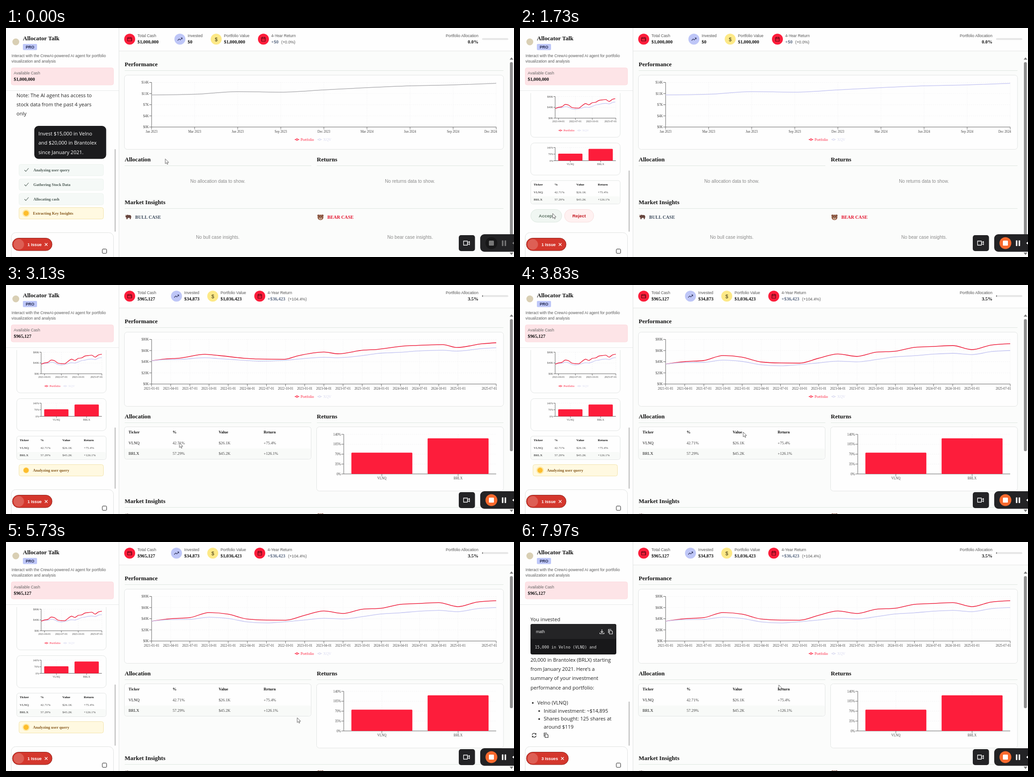
An HTML page for the animation above (8000 ms loop, 1113 px wide and 503 px high).

```html
<!DOCTYPE html>
<html lang="en">
<head>
<meta charset="utf-8">
<title>Portfolio dashboard</title>
<style>
html, body { margin: 0; width: 100%; height: 100%; overflow: hidden; background: #fcfcfc; }
svg { display: block; width: 1113px; height: 503px; }
text { white-space: pre; }
.serif { font-family: "Liberation Serif", serif; }
.sans { font-family: "Liberation Sans", sans-serif; }
.chat { font-family: "Open Sans", sans-serif; }
.mono { font-family: "DejaVu Sans Mono", monospace; }
.b { font-weight: 700; }
</style>
</head>
<body>
<svg id="stage" viewBox="0 0 1113 503"></svg>
<script>
const LOOP = 8000;
const RESULTS = 430, ACCEPTED = 2330, CHARTS = 2490, REPLY = 6400, CODE = 6560, STREAM = 6919, ISSUES = 7400;
const RED = '#fd1d3b', LINE_RED = '#ee2340', LAVENDER = '#c9caf3', BORDER = '#e2e5e4', INK = '#111';
const TICKERS = ['VLNQ', 'BRLX'], RETURNS = [75.4, 126.1];

const clamp = (v, lo = 0, hi = 1) => Math.min(hi, Math.max(lo, v));
const mix = (a, b, p) => a + (b - a) * p;

// cubic-bezier(.25, .1, .25, 1)
function ease(x) {
  x = clamp(x);
  if (x === 0 || x === 1) return x;
  const bez = (a, b, u) => 3 * a * u * (1 - u) ** 2 + 3 * b * u * u * (1 - u) + u ** 3;
  let lo = 0, hi = 1;
  for (let i = 0; i < 24; i++) {
    const mid = (lo + hi) / 2;
    if (bez(.25, .25, mid) < x) lo = mid; else hi = mid;
  }
  return bez(.1, 1, lo);
}

// ---- drawing helpers ----
const text = (x, y, s, cls, size, fill = INK, anchor = 'start') =>
  `<text x="${x}" y="${y}" class="${cls}" font-size="${size}" fill="${fill}" text-anchor="${anchor}">${s}</text>`;
const rect = (x, y, w, h, r, fill, stroke = 'none') =>
  `<rect x="${x}" y="${y}" width="${w}" height="${h}" rx="${r}" fill="${fill}" stroke="${stroke}"/>`;
const circle = (x, y, r, fill) => `<circle cx="${x}" cy="${y}" r="${r}" fill="${fill}"/>`;
const path = (d, stroke, w = 1, extra = '') =>
  `<path d="${d}" fill="none" stroke="${stroke}" stroke-width="${w}" ${extra}/>`;
const at = (x, y, s) => `<g transform="translate(${x} ${y})">${s}</g>`;
const group = (id, s = '') => `<g id="${id}">${s}</g>`;
const card = (x, y, w, h, r = 6) => rect(x, y, w, h, r, '#fefefe', BORDER);

function heading(x, y, label, right) {
  return text(x, y, label, 'serif b', 13) + path(`M${x} ${y + 9.5}H${right}`, '#dfe7e0');
}

function axes(box, yLabels, xTicks, size) {
  const { x0, x1, y0, y1 } = box, tick = size > 6 ? 5 : 3.5;
  let grid = '', out = path(`M${x0} ${y0}V${y1}H${x1}`, '#666');
  yLabels.forEach((label, i) => {
    const y = mix(y0, y1, i / (yLabels.length - 1));
    grid += `M${x0} ${y}H${x1}`;
    out += path(`M${x0 - tick} ${y}h${tick}`, '#666') +
      text(x0 - tick - 1, y + size * .36, label, 'serif', size, '#444', 'end');
  });
  for (const [x, label, atEnd] of xTicks) {
    grid += `M${x} ${y0}V${y1}`;
    out += path(`M${x} ${y1}v${tick}`, '#666') +
      text(atEnd ? x + 2 : x, y1 + tick + size, label, 'serif', size, '#444', atEnd ? 'end' : 'middle');
  }
  return path(grid, '#f0f0f2', .8, 'stroke-dasharray="2.2 2.2"') + out;
}

function legend(x, y, size) {
  const k = size / 8.2;
  const key = (dx, label, color) => at(x + dx * k, y,
    path(`M${-5 * k} 0H${5 * k}`, color, 1.3 * k) +
    `<circle r="${1.9 * k}" fill="#fff" stroke="${color}" stroke-width="${1.2 * k}"/>` +
    text(8 * k, size * .32, label, 'serif', size, color));
  return key(0, 'Portfolio', RED) + key(49.5, 'XQV', '#d9daf0');
}

function bars(box, grow) {
  const { x0, x1, y0, y1 } = box, band = (x1 - x0) / 2;
  return RETURNS.map((v, i) => {
    const h = (y1 - y0) * v / 140 * grow;
    return h > 0 ? rect(x0 + band * (i + .1), y1 - h, band * .8, h, 1.5, RED) : '';
  }).join('');
}

function table(x, y, w, h, cols, size, rowGap) {
  const rows = [['Ticker', '%', 'Value', 'Return'],
    [TICKERS[0], '42.71%', '$26.1K', '+75.4%'], [TICKERS[1], '57.29%', '$45.2K', '+126.1%']];
  const first = y + rowGap * .64;
  return card(x, y, w, h, 5) + rect(x + 1, y + h - rowGap, w - 2, rowGap - 1, 4, '#f8faf8') +
    rows.map((row, r) => row.map((cell, c) =>
      text(cols[c], first + r * rowGap, cell, r ? 'serif' : 'serif b', size, r && c ? '#444' : INK)).join('')).join('');
}

// Monotone cubic through points with increasing x
function curve(points) {
  const p = points.filter((q, i) => !i || Math.hypot(q[0] - points[i - 1][0], q[1] - points[i - 1][1]) > .01);
  const n = p.length;
  const h = i => p[i + 1][0] - p[i][0];
  const s = i => (p[i + 1][1] - p[i][1]) / (h(i) || 1);
  const m = p.map((_, i) => {
    if (!i || i === n - 1) return null;
    const a = s(i - 1), b = s(i), mean = (a * h(i) + b * h(i - 1)) / (h(i - 1) + h(i));
    return (Math.sign(a) + Math.sign(b)) * Math.min(Math.abs(a), Math.abs(b), .5 * Math.abs(mean)) || 0;
  });
  m[0] = (3 * s(0) - m[1]) / 2;
  m[n - 1] = (3 * s(n - 2) - m[n - 2]) / 2;
  let d = `M${p[0]}`;
  for (let i = 0; i < n - 1; i++) {
    const k = h(i) / 3, [xa, ya] = p[i], [xb, yb] = p[i + 1];
    d += `C${xa + k} ${ya + k * m[i]} ${xb - k} ${yb - k * m[i + 1]} ${xb} ${yb}`;
  }
  return d;
}

// ---- chart data ----
const MAIN = { x0: 319, x1: 1074, y0: 119.5, y1: 217.5 };
const RETURN_BOX = { x0: 740, x1: 1074, y0: 328, y1: 415 };
const MINI = { x0: 77, x1: 210, y0: 150.5, y1: 198 };
const MINI_BARS = { x0: 77, x1: 210, y0: 262.5, y1: 291.5 };
const spread = (ys, box) => ys.map((y, i) => [mix(box.x0, box.x1, i / (ys.length - 1)), y]);
const oldLine = spread([147, 145.5, 139.7, 141, 136, 131, 127, 125, 121.5], MAIN);
const portfolio = spread([174, 168.5, 166, 155, 158.5, 169.3, 171.5, 171.8, 161, 151.5, 157, 147.7, 145.5,
  137, 135, 133.2, 142, 132, 129], MAIN);
const benchmark = spread([174, 170.5, 170, 165.2, 168, 175.5, 177.8, 175, 171.3, 167.5, 169, 164, 158,
  155.5, 152, 150.3, 153, 146.5, 144], MAIN);
const toMini = ([x, y]) => [
  mix(MINI.x0, MINI.x1, (x - MAIN.x0) / (MAIN.x1 - MAIN.x0)),
  mix(MINI.y0, MINI.y1, (y - MAIN.y0) / (MAIN.y1 - MAIN.y0))];
const morph = (to, p) => to.map((pt, i) => {
  const from = oldLine[Math.floor(i * oldLine.length / to.length)];
  return [mix(from[0], pt[0], p), mix(from[1], pt[1], p)];
});
const quarter = i => `${2021 + (i >> 2)}-${['01', '04', '07', '10'][i % 4]}-01`;
const quarterTick = (box, i) => [mix(box.x0, box.x1, i / 18), quarter(i), i === 18];
const oldTicks = oldLine.map(([x], i) =>
  [x, i ? `${['Dec', 'Mar', 'Jun', 'Sep'][i % 4]} ${i < 5 ? 2023 : 2024}` : 'Jan 2023', i === 8]);
const tickerTicks = box => TICKERS.map((name, i) => [mix(box.x0, box.x1, .25 + i / 2), name]);

// ---- icons ----
const glyphs = {
  wallet: path('M-4.5 -3.5H3.5V-1.5M-4.5 -3.5V4H4.5V-1.5H-4.5M2 1.2h2.5', '#46060f', 1.1),
  trend: path('M-5 3L-1.5 -.5L.8 1.8L5 -2.6M2 -2.8H5V.2', '#2b2f55', 1.1),
  dollar: text(0, 4, '$', 'sans', 11, '#3b3410', 'middle'),
  calendar: path('M-4 -3.5H4V4.5H-4ZM-4 -.8H4M-2 -5v2.5M2 -5v2.5', '#46060f', 1.1),
  copy: path('M-2 -2.5H2.5L4.500 -.5V5H-2ZM-4.200 3V-5H2', 'currentColor', 1.2),
  download: path('M0 -5V2M-2.8 -.6L0 2.2L2.8 -.6M-4.5 2V4.5H4.5V2', 'currentColor', 1.2),
  refresh: path('M-4.4 -1A4.6 4.6 0 0 1 4 -2.2V-4.8M4 -2.2H1.5M4.4 1A4.6 4.6 0 0 1 -4 2.2V4.8M-4 2.2H-1.5', 'currentColor', 1.2)
};
const icon = (name, x, y, color = '#333') => `<g color="${color}">${at(x, y, glyphs[name])}</g>`;
const bull = at(268, 415, '<path d="M-6 -3Q-3 -6 1 -4Q6 -5 6.500 0L5 5H3.500L3 2H-1L-2 5H-4L-4.500 1Q-7 1 -6 -3Z" fill="#67463e"/>' +
  path('M-6.500 -5q1 2 3 1.500', '#b9a79b', 1.2));
const bear = at(689, 416, circle(-4.5, -4, 2.3, '#7c4a38') + circle(4.5, -4, 2.3, '#7c4a38') +
  `<ellipse rx="6.500" ry="6" fill="#95604a"/><ellipse cy="2" rx="3" ry="2.500" fill="#d9b59c"/>` +
  circle(-2.5, -1.3, .8, '#2a1a14') + circle(2.5, -1.3, .8, '#2a1a14') + circle(0, 1.2, 1, '#2a1a14'));

// ---- sections ----
function stats(xs, values, change, percent, allocation) {
  const labels = ['Total Cash', 'Invested', 'Portfolio Value', '4-Year Return'];
  const fills = [RED, '#bec6f7', '#fde987', RED];
  const names = ['wallet', 'trend', 'dollar', 'calendar'];
  const changeX = xs[3] + 17;
  return xs.map((x, i) => circle(x, 24.5, 12, fills[i]) + icon(names[i], x, 24.5) +
    text(x + 17, 20.3, labels[i], 'sans', 8.7, '#555') +
    (values[i] ? text(x + 17, 34, values[i], 'serif b', 10.3) : '')).join('') +
    text(changeX, 34, change, 'serif b', 10.2, '#5a6982') +
    text(changeX + (change.length > 4 ? 45 : 22), 33.7, percent, 'sans', 8.8, '#555') +
    text(1035, 34, allocation + '%', 'serif b', 10.3, INK, 'end') +
    rect(1043, 22.3, 57.5, 4, 2, '#e6e6e6') +
    (allocation > 0 ? rect(1043, 22.3, 57.5 * allocation / 100, 4, 1, '#888') : '');
}

function insights(y) {
  return at(0, y, heading(260, 387, 'Market Insights', 1090) + bull + bear +
    text(283, 419, 'BULL CASE', 'serif b', 10.1, '#3c4a5c') + text(704, 419, 'BEAR CASE', 'serif b', 10.1, '#e3122c') +
    text(464, 463, 'No bull case insights.', 'sans', 10.1, '#8b8b8b', 'middle') +
    text(885.5, 463, 'No bear case insights.', 'sans', 10.1, '#8b8b8b', 'middle'));
}

const before = stats([271, 381, 460.5, 564], ['$1,000,000', '$0', '$1,000,000'], '+$0', '(+0.0%)', '0.0') +
  axes(MAIN, ['$14K', '$11K', '$7K', '$4K', '$0K'], oldTicks, 7.25) +
  text(464, 339.5, 'No allocation data to show.', 'sans', 10.1, '#8b8b8b', 'middle') +
  text(885, 339.5, 'No returns data to show.', 'sans', 10.1, '#8b8b8b', 'middle') +
  insights(0) + rect(1104, 75, 6.5, 414, 3, '#8e8e8e');

const after = stats([271, 373.5, 453, 556], ['$965,127', '$34,873', '$1,036,423'], '+$36,423', '(+104.4%)', '3.5') +
  axes(MAIN, ['$80K', '$60K', '$40K', '$20K', '$0K'],
    [...Array(19).keys()].filter(i => i !== 17).map(i => quarterTick(MAIN, i)), 7.25) +
  table(259.5, 311.5, 409, 71, [268.5, 365, 466, 564.5], 8.7, 23.4) +
  card(680.5, 311.5, 409.5, 141) +
  axes(RETURN_BOX, ['140%', '105%', '70%', '35%', '0%'], tickerTicks(RETURN_BOX), 7.25) +
  insights(92) + rect(1104, 75, 6.5, 290, 3, '#8e8e8e');

function step(y, label, active) {
  return rect(28.5, y + .5, 185, 25, 4, active ? '#fff9e1' : '#f5f9f7', active ? '#f3e4ab' : '#edf3ef') +
    (active ? '' : path(`M40.500 ${y + 13}l3 3l6 -7`, '#56655e', 1.1)) +
    text(active ? 59 : 60, y + 16, label, 'serif b', 8.7, active ? '#85581c' : '#4c5a54');
}

const request = [['Note: The AI agent has access to', 151.5], ['stock data from the past 4 years', 172], ['only', 192.3]]
  .map(([s, y]) => text(23, y, s, 'chat', 11, '#222')).join('') +
  rect(62, 215, 157.5, 72.5, 9, '#1b1b1d') +
  ['Invest $15,000 in Velno', 'and $20,000 in Brantolex', 'since January 2021.']
    .map((s, i) => text(71, 235.7 + i * 20.4, s, 'chat', 11, '#fff')).join('') +
  ['Analyzing user query', 'Gathering Stock Data', 'Allocating cash'].map((s, i) => step(299 + i * 32, s)).join('') +
  step(394, 'Extracting Key Insights', true);

const results = card(23.5, 125.5, 196, 114.5, 8) +
  axes(MINI, ['$80K', '$40K', '$0K'], [1, 6, 11, 18].map(i => quarterTick(MINI, i)), 5.8) + legend(88.5, 225, 6.8) +
  card(23.5, 252.5, 196, 70.5, 8) + axes(MINI_BARS, ['140%', '70%', '0%'], tickerTicks(MINI_BARS), 5.8) +
  table(23.5, 335, 196, 51.5, [30, 75.5, 123.5, 170.5], 7.15, 16.8);

const pill = (x, w, label, fill, stroke, ink) =>
  rect(x + .5, 398.5, w, 28, 14, fill, stroke) + text(x + w / 2 + .5, 416, label, 'sans b', 9.9, ink, 'middle');
const buttons = pill(23, 68, 'Accept', '#f0f6f2', '#dde8e0', '#5b7062') + pill(97, 64, 'Reject', '#fff1f1', '#f7dede', '#c4161f');

// x, middle, text, bullet x
const replyLines = [
  [23, 514.5, '20,000 in Brantolex (BRLX) starting'], [23, 534.8, 'from January 2021. Here\u2019s a'],
  [23, 555.2, 'summary of your investment'], [23, 575.6, 'performance and portfolio:'],
  [38, 609, 'Velno (VLNQ)', 28], [52, 626.7, 'Initial investment: ~$14,895', 42],
  [52, 644.4, 'Shares bought: 125 shares at', 42], [52, 662, 'around $119']
];
const replyLength = replyLines.reduce((n, line) => n + line[2].length, 0);

function reply(t) {
  let out = text(23, 430, 'You invested', 'chat', 11, '#222'), bottom = 436;
  let left = t < STREAM ? 0 : Math.floor(2 + (t - STREAM) / (7960 - STREAM) * replyLength);
  if (t > CODE) {
    const width = clamp(left * 5.4, 160, 188), right = 23 + width;
    const code = '15,000 in Velno (VLNQ) and'.slice(0, Math.floor((t - CODE) / 11));
    out += rect(23, 436, width, 67, 4, '#18181a') + rect(23, 436, width, 33, 4, '#242426') +
      text(35, 456, 'math', 'sans', 8.7, '#eee') + text(32.5, 489.5, code, 'mono', 8.63, '#ddd') +
      icon('download', right - 31.5, 453, '#eee') + icon('copy', right - 13, 453, '#eee');
    bottom = 514;
  }
  for (const [x, y, s, dot] of replyLines) {
    if (left <= 0) break;
    out += text(x, y + 4, s.slice(0, left), 'chat', 11, '#222') + (dot ? circle(dot, y + .5, 1.8, '#222') : '');
    left -= s.length;
    // Paragraph lines are taller than list lines
    bottom = y + (x > 23 ? 8.8 : 10.2);
  }
  return { svg: out, scroll: bottom - 414.8, actions: t > STREAM };
}

function recorder(live) {
  const ink = live ? '#fff' : '#777', panel = '#232325';
  return rect(992, 455, 35.5, 35, 5, panel) +
    path('M1002.500 468h8.500v9h-8.500zM1011 471.500l4.500 -2.500v7l-4.500 -2.500', '#fff', 1.3) +
    rect(1039, 453, 90, 38.5, 9, panel) + circle(1063.5, 472.5, 13, live ? '#f96a2e' : '#171718') +
    rect(1058, 467, 11, 11, 1.5, ink) + rect(1086.5, 466.5, 3.2, 12.5, 1, ink) + rect(1092.5, 466.5, 3.2, 12.5, 1, ink) +
    `<path d="M1109 472.500l4 -3v6z" fill="${ink}"/>`;
}

function issues(count) {
  const w = count > 1 ? 92 : 87, x = 14 + w - 13;
  return rect(14, 461.5, w, 27.5, 13.7, '#d4372d', '#8e211a') + circle(28, 475.3, 11.5, '#dd5f55') +
    text(47, 478.7, `${count} Issue${count > 1 ? 's' : ''}`, 'sans b', 9.2, '#fff') +
    path(`M${x - 3} 472.500l6 6m0 -6l-6 6`, '#fff', 1.1);
}

document.getElementById('stage').innerHTML =
  '<clipPath id="chatClip"><rect x="0" y="143" width="246" height="305"/></clipPath>' +
  rect(0, 0, 1113, 503, 0, '#fbfcfb') + rect(248, 0, 865, 50, 0, '#fefefe') + path('M248 50.5H1113', '#e4e6e5') +
  text(1035, 20.3, 'Portfolio Allocation', 'sans', 8.7, '#555', 'end') +
  heading(260, 84, 'Performance', 1090) + card(259.5, 103.5, 830.5, 163) +
  heading(260, 293, 'Allocation', 669) + heading(681, 293, 'Returns', 1090) +
  group('before', before) + group('after', after) + legend(637.5, 245, 8.2) + group('mainLines') +
  '<path d="M1103.500 69.500l4 -5l4 5zM1103.500 493.500l4 5l4 -5z" fill="#777"/>' +
  rect(0, 0, 247, 503, 0, '#fefefe') + path('M247.5 0V503', '#e1e3e2') + path('M0 137.5H247', '#e8eae9') +
  circle(21.5, 30.5, 7.5, '#d9cfb4') + text(37, 26.5, 'Allocator Talk', 'serif b', 13.1) +
  rect(37, 35, 31, 13.5, 2, '#bec7f8') + text(52.5, 45, 'PRO', 'sans b', 8.6, '#252b50', 'middle') +
  text(12, 64, 'Interact with the CrewAI-powered AI agent for portfolio', 'sans', 8.62, '#5c5c5c') +
  text(12, 75.5, 'visualization and analysis', 'sans', 8.62, '#5c5c5c') +
  rect(11.5, 87.5, 224, 37.5, 4, '#fde4e7', '#fcdade') + text(17, 102.3, 'Available Cash', 'sans', 8.7, '#666') +
  group('cash') + `<g clip-path="url(#chatClip)">${group('chat')}</g>` + group('chatScroll') +
  rect(11.5, 449.5, 224, 70, 10, '#fefefe', '#e0e2e1') + rect(211, 485.5, 9.5, 9.5, 2, 'none', '#222') +
  group('issues') + group('recorder') +
  `<path id="cursor" d="M0 0V10.500L2.500 8.300L4.200 12L5.800 11.200L4.200 7.700H7.500Z" fill="#fff" stroke="#555" stroke-width=".9"/>`;

const el = id => document.getElementById(id);
const shown = {};
function put(id, svg) {
  if (shown[id] !== svg) el(id).innerHTML = shown[id] = svg;
}

// time, x, y
const cursorKeys = [[0, 349, 287.5], [250, 349, 287.5], [800, 270, 327], [1400, 62, 408], [2550, 110, 405],
  [3450, 489, 323], [3900, 489, 323], [4950, 638, 386], [6380, 638, 386], [6880, 569, 313.5], [8000, 567, 314]];
function cursorAt(t) {
  const i = Math.max(1, cursorKeys.findIndex(k => k[0] > t));
  const [ta, xa, ya] = cursorKeys[i - 1], [tb, xb, yb] = cursorKeys[i];
  const u = (t - ta) / (tb - ta), p = u * u * (3 - 2 * u);
  return [mix(xa, xb, p), mix(ya, yb, p)];
}

function chatContent(t) {
  const pulse = circle(44, 407, 7.5 + .8 * Math.cos(t / 1000 * Math.PI), '#fde9a8') + circle(44, 407, 5.7, '#fdbd2c');
  if (t < RESULTS) return { svg: request + pulse, bar: 266 };
  const drawn = ease((t - RESULTS) / 1500);
  const mini = (points, color) => path(curve(points.map(toMini)), color, 1.4, `pathLength="1" stroke-dasharray="${drawn} 2"`);
  const summary = results + mini(benchmark, LAVENDER) + mini(portfolio, LINE_RED) + bars(MINI_BARS, ease((t - RESULTS) / 400));
  if (t < ACCEPTED) return { svg: summary + buttons, bar: 313 };
  if (t < REPLY) return { svg: at(0, -3, summary) + step(394, 'Analyzing user query', true) + pulse, bar: 313 };
  const answer = reply(t);
  const actions = answer.actions ? icon('refresh', 31, 424.5) + icon('copy', 57, 424.5) : '';
  return { svg: at(0, -answer.scroll, summary + answer.svg) + actions, bar: mix(319, 350.5, answer.scroll / 256) };
}

function render(t) {
  const accepted = t >= ACCEPTED, live = t >= 120;
  el('before').style.display = accepted ? 'none' : '';
  el('after').style.display = accepted ? '' : 'none';
  put('cash', text(17, 116, accepted ? '$965,127' : '$1,000,000', 'serif b', 10.3));

  const p = ease((t - CHARTS) / 1500);
  const line = (points, color) => path(curve(points), color, 1.55);
  put('mainLines', accepted
    ? line(morph(portfolio, p), LINE_RED) + line(morph(benchmark, p), LAVENDER) + bars(RETURN_BOX, ease((t - CHARTS) / 400))
    : line(oldLine, live ? LAVENDER : '#b3b3b6'));

  const chat = chatContent(t);
  put('chat', chat.svg);
  put('chatScroll', rect(238.3, chat.bar, 1.6, 447.5 - chat.bar, .8, '#a8a8a8'));
  put('issues', issues(t < ISSUES ? 1 : 3));
  put('recorder', recorder(live));

  const cursor = el('cursor');
  cursor.setAttribute('transform', `translate(${cursorAt(t)})`);
  cursor.style.display = t > 1970 && t < 2550 ? 'none' : '';
}

const start = performance.now();
function tick() {
  render((performance.now() - start) % LOOP);
  requestAnimationFrame(tick);
}
tick();
</script>
</body>
</html>
```
